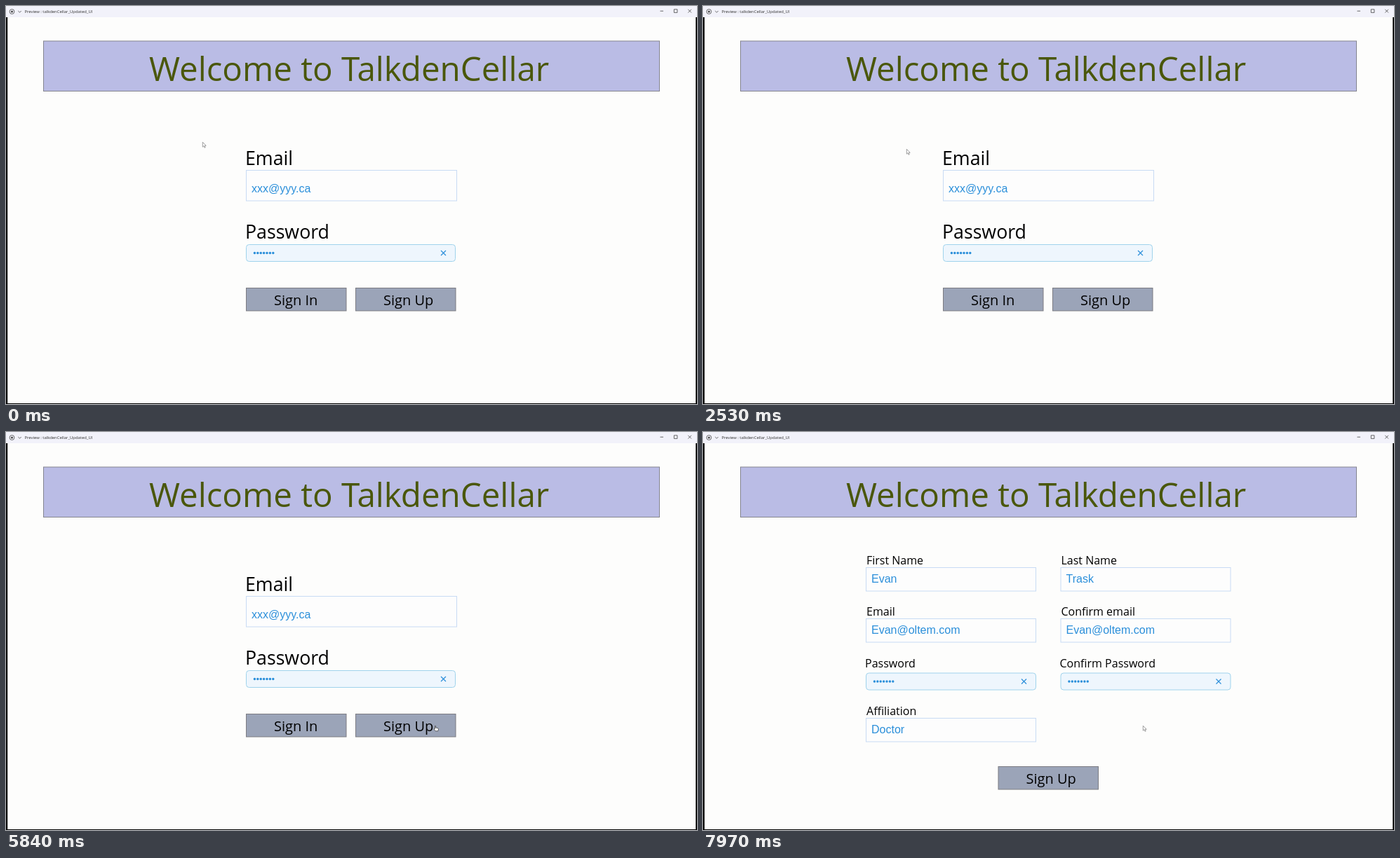
These frames come from a looping animation (985 by 568 pixels, 8 s). An HTML page:

```html
<!DOCTYPE html>
<html lang="en">
<head>
<meta charset="utf-8">
<title>Sign up preview</title>
<style>
  html, body { margin: 0; width: 100%; height: 100%; overflow: hidden; background: #fdfdfc; }
  svg { display: block; width: 985px; height: 568px; }
  text { font-family: "Open Sans", "Noto Sans", sans-serif; white-space: pre; }
  .big { font-size: 26.7px; }
  .small { font-size: 16px; }
  .btn { font-size: 20px; }
  .value { font: 16px "Liberation Sans", Arial, sans-serif; fill: #2b8fda; }
  .box { fill: #fdfdfd; stroke: #c8dbf4; }
  .secret { fill: #eef6fd; stroke: #a0d3ec; }
  .button { fill: #9ba4b8; stroke: #7c7c82; }
  .line { fill: none; stroke: #444; stroke-width: .8; }
</style>
</head>
<body>
<svg viewBox="0 0 985 568">
  <rect width="985" height="568" fill="#fdfdfc"/>
  <g id="login"></g>
  <g id="signup">
    <rect y="123" width="985" height="445" fill="#fdfdfc"/>
  </g>

  <rect x="53.5" y="50" width="878" height="71.5" fill="#babce5" stroke="#85858f"/>
  <text x="204" y="107" font-size="47.5" fill="#4a570b">Welcome to TalkdenCellar</text>

  <path d="M0 16h2.2v551h981V16h1.8v552H0z"/>
  <rect width="985" height="16" fill="#f2f2fa"/>
  <circle cx="8.5" cy="8" r="3.4" class="line"/>
  <circle cx="8.5" cy="8" r="1.5" fill="#444"/>
  <path class="line" d="M17.3 7l2.2 2.2L21.700 7M932.500 7.200h4.500M952.300 4.800h4.600v4.600h-4.600zM972.300 4.800l4.700 4.700m0-4.700l-4.700 4.700"/>
  <text x="26.500" y="10.300" font-size="5.900" fill="#333">Preview : talkdenCellar_Updated_UI</text>

  <g id="cursor" stroke-linejoin="round">
    <path id="arrow" d="M.3.3V7.200l1.600-1.500 1.200 2.600 1.100-.5L3.100 5.300h2.100z" fill="#fff" stroke="#777" stroke-width=".7"/>
    <path id="hand" d="M-.6.500Q0-.200.600.500V3l3 .700Q4.600 4 4.400 5L3.800 7.800H.200L-2 5q-.2-1 .500-.900l.900.700z" fill="#fff" stroke="#333" stroke-width=".7"/>
  </g>
</svg>
<script>
const $ = id => document.getElementById(id);

const text = (cls, x, y, s) => `<text class="${cls}" x="${x}" y="${y}">${s}</text>`;
const rect = (cls, x, y, w, h, r = 0) =>
  `<rect class="${cls}" x="${x + .5}" y="${y + .5}" width="${w}" height="${h}" rx="${r}"/>`;

const field = (x, y, w, h, s) =>
  rect('box', x, y, w, h) + text('value', x + 8, y + h / 2 + 5.7 + (h > 40 ? 4.5 : 0), s);

function secret(x, y, w) {
  let dots = '';
  for (let i = 0; i < 7; i++)
    dots += `<circle cx="${x + 12.4 + i * 4.4}" cy="${y + 12.5}" r="1.7" fill="#2b8fda"/>`;
  return rect('secret', x, y, w, 24, 4) + dots +
    `<path d="M${x + w - 20} ${y + 9}l7 7m0-7l-7 7" stroke="#2b8fda" stroke-width="1.2"/>`;
}

const button = (x, y, s) => rect('button', x, y, 142.500, 32.500) + text('btn', x + 40, y + 25, s);

$('login').innerHTML =
  text('big', 341, 227, 'Email') + field(342, 234, 300, 43.500, 'xxx@yyy.ca') +
  text('big', 341, 332.300, 'Password') + secret(342, 340, 298) +
  button(342, 402, 'Sign In') + button(498, 402, 'Sign Up');

const mail = 'Evan@oltem.com';
const entry = (x, y, label, value) =>
  text('small', x + 1, y - 4, label) + field(x, y, 242, 33.500, value);
const password = (x, label) => text('small', x - 1, 335.700, label) + secret(x, 343.500, 242);

$('signup').innerHTML +=
  entry(232, 193, 'First Name', 'Evan') + entry(509.500, 193, 'Last Name', 'Trask') +
  entry(232, 266, 'Email', mail) + entry(509.500, 266, 'Confirm email', mail) +
  password(232, 'Password') + password(509.500, 'Confirm Password') +
  entry(232, 408, 'Affiliation', 'Doctor') + button(420.500, 477, 'Sign Up');

const ease = (t, from, to) => {
  const k = Math.min(1, Math.max(0, (t - from) / (to - from)));
  return k * k * (3 - 2 * k);
};

// Pointer moves: start, end, dx, dy
const moves = [
  [290, 400, 10, 10],
  [4230, 4670, 523, 122],
  [4750, 5550, -201, 93],
  [5870, 6400, 15, 0]
];

function draw(now) {
  const t = now % 8000;
  let x = 280, y = 194;
  for (const [from, to, dx, dy] of moves) {
    const k = ease(t, from, to);
    x += dx * k;
    y += dy * k;
  }
  const over = x > 498 && x < 641 && y > 402 && t < 6800;
  $('cursor').setAttribute('transform', `translate(${x} ${y})`);
  $('hand').style.display = over ? '' : 'none';
  $('arrow').style.display = over ? 'none' : '';
  $('signup').style.opacity = ease(t, 6790, 7390);
}

const start = performance.now();
function loop() {
  draw(performance.now() - start);
  requestAnimationFrame(loop);
}
loop();
</script>
</body>
</html>
```
